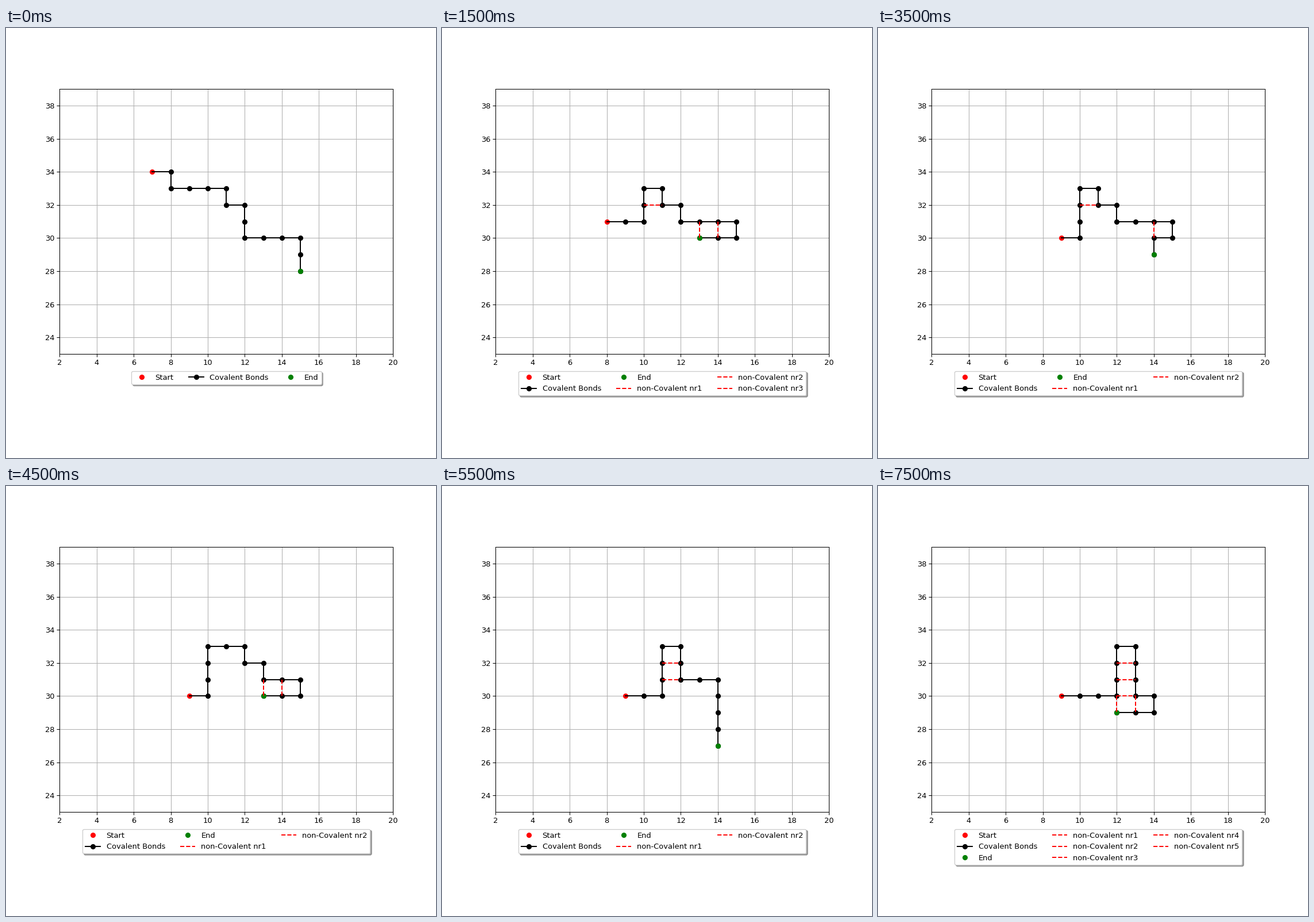
A matplotlib script for the animation above (8 s loop, 748 px wide and 748 px high).

```python
import matplotlib.pyplot as plt
from matplotlib.animation import FuncAnimation

INCHES, DPI = 8, 93.5
STEPS = {"R": (1, 0), "L": (-1, 0), "U": (0, 1), "D": (0, -1)}

# Each fold: first node, then the direction of every bond.
FOLDS = [
    (7, 34, "RDRRRDRDDRRRDD"),
    (7, 32, "URRRRDRDRDRRDR"),
    (8, 31, "URRURDRDRRRDDL"),
    (8, 31, "RRUURDRDRRRDLL"),
    (8, 31, "RRUURDDRRRRDLL"),
    (8, 31, "RRUURDRDRRRDLD"),
    (10, 29, "UUUURDRDRRRDLD"),
    (9, 30, "RUUURDRDRRRDLD"),
    (9, 30, "URUURRDRDRRDLL"),
    (9, 30, "RUUURRDRDRRDLL"),
    (9, 30, "RUURURRDDRDRDD"),
    (9, 30, "RRUUURDDRRDDDD"),
    (9, 30, "RRUUURDRDDRDDL"),
    (10, 31, "DRUURURDDDRDLL"),
    (10, 31, "DRURUURDDDRDLL"),
    (9, 30, "RRRUUURDDDRDLL"),
]


def nodes(x, y, path):
    pts = [(x, y)]
    for step in path:
        dx, dy = STEPS[step]
        x, y = x + dx, y + dy
        pts.append((x, y))
    return pts


def contacts(pts):
    """Pairs of nodes that touch on the lattice without being bonded."""
    return [
        (a, b)
        for i, a in enumerate(pts)
        for b in pts[i + 2:]
        if abs(a[0] - b[0]) + abs(a[1] - b[1]) == 1
    ]


fig = plt.figure(figsize=(INCHES, INCHES), dpi=DPI, facecolor="white")
ax = fig.add_axes([0.1249, 0.242, 0.775, 0.616])


def draw(frame):
    ax.clear()
    ax.set(xlim=(2, 20), ylim=(23, 39),
           xticks=range(2, 21, 2), yticks=range(24, 39, 2))
    ax.grid(True)

    pts = nodes(*FOLDS[frame])
    ax.plot(*pts[0], "ro", label="Start")
    ax.plot(*zip(*pts), "k-o", markevery=slice(1, None), label="Covalent Bonds")
    ax.plot(*pts[-1], "go", label="End")
    for n, pair in enumerate(contacts(pts), 1):
        ax.plot(*zip(*pair), "r--", label=f"non-Covalent nr{n}")

    ax.legend(loc="upper center", bbox_to_anchor=(0.5, -0.05),
              fancybox=True, shadow=True, ncol=3)
    return ax.get_children()


anim = FuncAnimation(fig, draw, frames=len(FOLDS), interval=500,
                     repeat=True, repeat_delay=0, blit=False)
plt.show()
```
